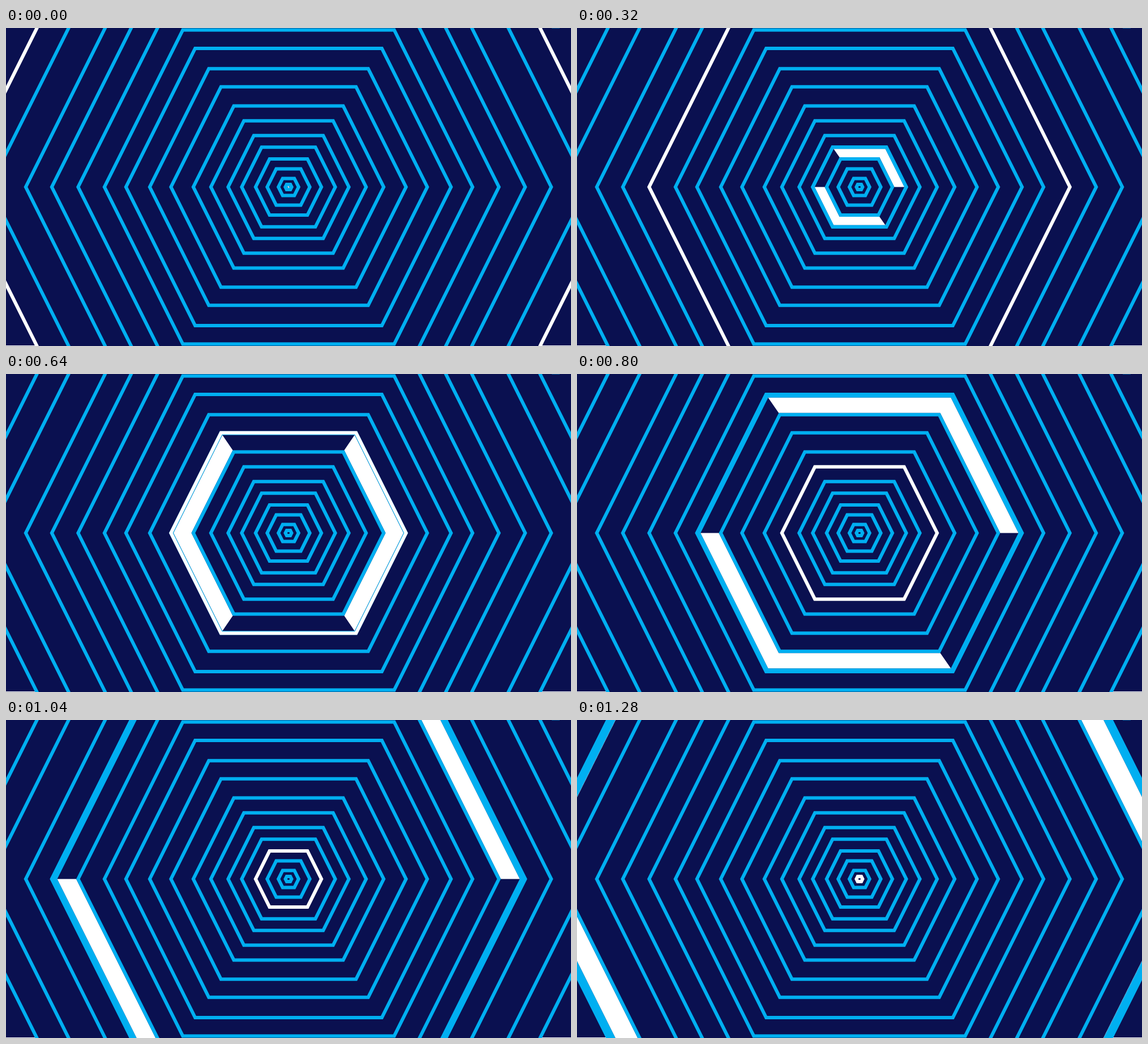
An HTML page with a canvas that plays this animation: 998x561 px, repeating every 1.36 s.

```html
<!DOCTYPE html>
<html lang="en">
<head>
<meta charset="utf-8">
<title>Hexagon tunnel</title>
<style>
  html, body { margin: 0; width: 100%; height: 100%; overflow: hidden; background: #0a1050; }
  canvas { display: block; width: 998px; height: 561px; }
</style>
</head>
<body>
<canvas id="stage" width="998" height="561"></canvas>
<script>
const ctx = document.getElementById('stage').getContext('2d');
const NAVY = '#0a1050', BLUE = '#00aff1', WHITE = '#fff';
const CX = 499, CY = 280.5, RATIO = 0.852, SLANT = Math.sqrt(1.25);
const LINE = 6, STEP = 80, STEPS = 17;

// Outer half widths, from the centre outwards; entry 0 is the centre point.
const radii = [0, 8.8, 21.2, 41, 61.5, 86, 110, 140.5, 171.5, 211, 248.5,
               290.5, 328.5, 375, 421.5, 467.5, 532, 588];

// Corners clockwise from the left one, moved inwards by `inset`.
function hexagon(r, inset = 0) {
  const h = Math.max(0, r * RATIO - inset);
  const w = Math.max(0, r - inset * SLANT);
  const t = Math.max(0, w - h / 2);
  return [[-w, 0], [-t, -h], [t, -h], [w, 0], [t, h], [-t, h]]
    .map(([x, y]) => [CX + x, CY + y]);
}

function trace(points) {
  points.forEach(([x, y], i) => i ? ctx.lineTo(x, y) : ctx.moveTo(x, y));
  ctx.closePath();
}

function ring(r, width, color) {
  ctx.fillStyle = color;
  ctx.beginPath();
  trace(hexagon(r));
  trace(hexagon(r, width));
  ctx.fill('evenodd');
}

// Four of the six sides between two neighbouring rings light up.
function band(step, inset) {
  const outer = hexagon(radii[step + 1], inset);
  const inner = hexagon(radii[step]);
  const dark = (step + 2) % 3;
  ctx.fillStyle = ctx.strokeStyle = WHITE;
  ctx.beginPath();
  for (let i = 0; i < 6; i++) {
    const j = (i + 1) % 6;
    if (i % 3 !== dark) trace([outer[i], outer[j], inner[j], inner[i]]);
  }
  ctx.fill();
  if (step < 15) return;
  ctx.setLineDash([1, 1.5]);
  ctx.beginPath();
  for (const i of [dark, dark + 3]) {
    ctx.moveTo(...outer[i]);
    ctx.lineTo(...outer[(i + 1) % 6]);
  }
  ctx.stroke();
  ctx.setLineDash([]);
}

function draw(step) {
  ctx.fillStyle = NAVY;
  ctx.fillRect(0, 0, 998, 561);

  const edge = LINE + 0.45 * Math.max(0, step - 6) ** 1.3;
  ring(radii[step + 1], edge, BLUE);
  band(step, edge);
  for (let i = 1; i <= STEPS; i++) {
    ring(radii[i], LINE, i === STEPS - step ? WHITE : BLUE);
  }

  // Thin slivers on the stage border.
  ctx.fillStyle = WHITE;
  ctx.fillRect(0, 560, 51, 1);
  ctx.fillRect(947, 560, 51, 1);
  ctx.fillStyle = '#06508f';
  ctx.fillRect(964, 0, 14, 1);
}

let shown = -1;
function tick() {
  const step = Math.floor(performance.now() / STEP) % STEPS;
  if (step !== shown) draw(shown = step);
  requestAnimationFrame(tick);
}
tick();
</script>
</body>
</html>
```
